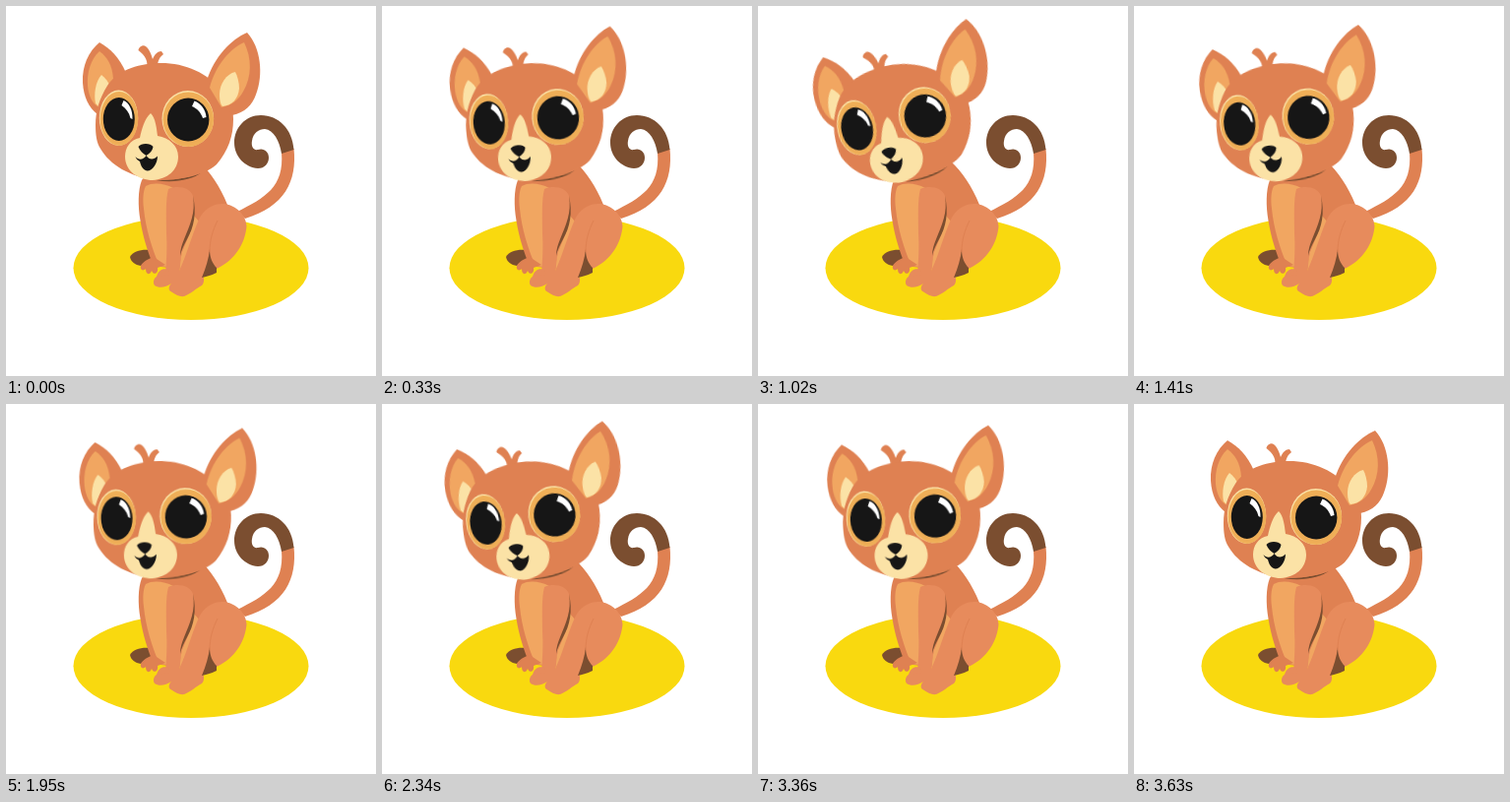
An HTML page for the animation above (3.73 s loop, 376x376 px).

```html
<!DOCTYPE html>
<html lang="en">
<head>
<meta charset="utf-8">
<title>Bush baby</title>
<style>
  html, body { margin: 0; width: 100%; height: 100%; overflow: hidden; background: #fff; }
  svg { display: block; width: 100vw; height: 100vh; }
  .fur { fill: #df8152; }
  .limb { fill: #e78b5c; }
  .tan { fill: #f1a661; }
  .cream { fill: #fbe2a6; }
  .brown { fill: #7b4e30; }
  .ring { fill: #efae57; }
  .black { fill: #161616; }
  .white { fill: #fff; }
  .rug { fill: #f9d90f; }
  .head {
    transform-origin: 158px 192px;
    animation: tilt 3730ms linear infinite;
  }
  @keyframes tilt {
    0%, 49.06%, 97.32%, 100% { transform: rotate(0deg); }
    24.53%, 73.19% { transform: rotate(-12.6deg); }
  }
</style>
</head>
<body>
<svg viewBox="0 0 376 376">
  <ellipse class="rug" cx="188" cy="266.200" rx="119.500" ry="52.700"/>

  <g id="tail">
    <path class="fur" d="M292.500 145C296 178 283 204 243 216L235 209C263 195 283 184 280 149Z"/>
    <path class="brown" d="M292.500 146C291 125 277 111 259 111C243 111 232 124 232 139C232 153 243 164 256 165C263 165 267 160 267 154C267 148 262 144 256 146C251 147 249 142 250 137C251 129 257 125 263 125C272 126 278 137 280 150Z"/>
  </g>

  <g id="body">
    <path class="brown" d="M126 255C129 249 138 247 147 248L150 259L137 264C131 263 127 260 126 255Z"/>
    <path class="fur" d="M138 177L150 160L196 158C207 168 218 184 225 202L212 240L180 268L150 264C144 250 139 234 136.500 218C134 203 134 187 138 177Z"/>
    <path class="tan" d="M142 183C149 179 161 180 170 185L172 266L156 264C148 246 142 226 140 206C139 197 139 189 142 183Z"/>
    <path class="fur" d="M150 255C144 257 139 260 137 264C136 268 139 270 142 267C142 273 146 274 148 269C150 274 155 272 154 266L162 263Z"/>
    <path class="limb" d="M165 186C174 182 187 184 190 193C192 209 187 228 181 243C178 252 177 262 176 273L162 272C163 259 164 245 163 231C163 214 162 197 165 186Z"/>
    <path class="tan" d="M191 213C189 228 183 240 179 250C177 258 177 265 176 272L184 273L197 220Z"/>
    <path class="limb" d="M196 217C201 206 211 200 222 201C234 203 244 212 244.500 224C243 241 233 258 214 267C207 270 203 272 200 274C202 278 201 282 199 284C193 287 187 293 181 295C176 296 170 292 166 289C165 286 166 284 168 282C163 286 155 287 151 284C149 281 150 277 153 275C157 271 165 268 176 269C183 255 188 235 196 217Z"/>
    <path class="limb" d="M153 275C155 268 160 266 165 268L167 273Z"/>
    <path class="brown" d="M207 247C207 256 210 262 214 266L214 271C208 274 203 275 199 276C203 266 206 257 207 247Z"/>
    <path class="brown" d="M190 193C194 210 191 225 184 237C181 243 178 248 177 254C177 247 179 242 181 237C187 222 193 210 190 193Z"/>
    <path d="M215 218C210 228 207 238 207 250" fill="none" stroke="#df8152"/>
  </g>

  <g class="head">
    <path class="brown" d="M140 174C157 179 181 177 199 169C187 179 160 181 140 174Z"/>

    <path class="fur" d="M122 68C115 52 106 43 95 37C84 46 77 61 78 78C79 93 84 103 93 110Z"/>
    <path class="tan" d="M109 74C108 60 103 52 95 46C86 54 82 68 83 81C84 92 88 99 94 103Z"/>
    <path class="cream" d="M97 70C91 77 89 89 91 99L95 103L106 82C104 77 101 73 97 70Z"/>

    <path class="fur" d="M142 64C146 57 141 50 134.500 45C135 41 140 39 142 41C146 44 148 50 149 54C151 49 154 46 158 46L160 49C156 52 154 56 154 62Z"/>
    <path class="fur" d="M154 58C180 57 205 67 219 87C227 95 231 105 231 115C231 132 226 147 214 161C200 173 177 177 151 177C126 173 106 162 96 145C92 139 91 130 91 121C91 106 95 94 103 81C113 66 132 59 154 58Z"/>

    <path class="fur" d="M204 76C212 51 229 34 245 27C259 42 262 70 254 90C250 101 243 108 230 111Z"/>
    <path class="tan" d="M207 83C213 60 228 43 242 37C250 53 250 72 241 87C236 96 229 101 219 103Z"/>
    <path class="cream" d="M233 67C224 69 217 79 217 90C217 96 218 100 220 102C230 101 236 94 237 84C237 77 235 71 233 67Z"/>

    <ellipse class="cream" cx="114.500" cy="113.700" rx="19.700" ry="28.200"/>
    <ellipse class="ring" cx="115" cy="114.400" rx="19.300" ry="27.500"/>
    <ellipse class="black" cx="114.800" cy="115" rx="16" ry="22"/>
    <path class="white" d="M119.500 96C125 98 129 106 128.500 115L126.500 114C125 108 122 104 117.500 101Z"/>

    <ellipse class="cream" cx="184.800" cy="114.500" rx="26.300" ry="28.500"/>
    <ellipse class="ring" cx="185.300" cy="115.200" rx="25.800" ry="27.800"/>
    <ellipse class="black" cx="185.200" cy="115.500" rx="21.200" ry="22"/>
    <path class="white" d="M191.500 96.500C198 99 203 105 203.500 113L200 114C198 108 194 104 189 102Z"/>

    <path class="cream" d="M147 109C141 114 138 125 136 134C126 136 121 144 121 153C121 168 135 177 149 177C164 176 175 167 175 153C175 142 166 134 154 132C153 124 152 114 147 109Z"/>
    <path class="black" d="M134.500 143C137 139 147 139 149.500 143C149 147 146 150 142.500 152C139 150 136 147 134.500 143Z"/>
    <path class="black" d="M131.500 153C134.500 156.500 139 157 142.500 152C146 157 150.500 156 154 152.500C154 160 149 167.500 143.500 167.500C139 167 137 162 136 158C134 157 132 155 131.500 153Z"/>
  </g>
</svg>
</body>
</html>
```
